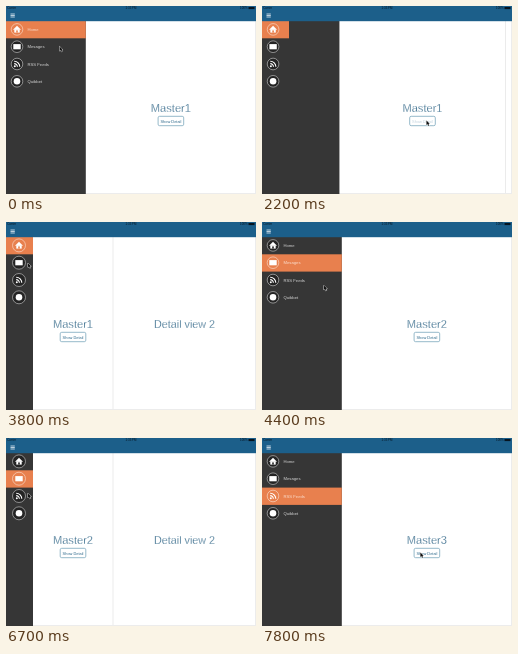
An HTML page with a canvas that plays this animation: 250x188 px, repeating every 8000 ms.

```html
<!DOCTYPE html>
<html lang="en">
<head>
<meta charset="utf-8">
<title>Split view navigation</title>
<style>
html, body { margin: 0; width: 100%; height: 100%; overflow: hidden; background: #fff; }
canvas { display: block; width: 250px; height: 188px; }
</style>
</head>
<body>
<canvas id="stage"></canvas>
<script>
const W = 250, H = 188, LOOP = 8000;
const BAR = 15, ROW = 17.3, OPEN = 79.8, CLOSED = 27, DETAIL = 143;
const SLIDE = 500, RELEASE = 600;
const BLUE = '#1c5f8a', ORANGE = '#e8804e', DARK = '#363636', INK = '#245d80';
const FONT = '"Liberation Sans", Arial, sans-serif';
const LABELS = ['Home', 'Mesages', 'RSS Feeds', 'Quibbet'];

// Start time of each slide and the state it leads to (1 = detail shown)
const SLIDES = [[2137, 1], [3890, 0], [5063, 1], [6840, 0]];
const PRESSES = [2100, 5030];
const PICKS = [3890, 6840];

// Cursor path: time, x, y
const PATH = [
  [0, 53.6, 40.5], [1350, 53.6, 40.5], [2000, 164.5, 114.6], [2450, 164.5, 114.6],
  [2800, 66, 52], [3150, 22, 41], [3800, 22, 41], [4250, 24, 43], [4400, 61.8, 63.5],
  [4900, 160.7, 114.5], [5600, 160.7, 114.5], [5900, 66, 66], [6600, 22, 55.5],
  [7200, 22, 55.5], [7700, 158.4, 114.5], [LOOP, 158.4, 114.5]
];

const canvas = document.getElementById('stage');
const dpr = window.devicePixelRatio || 1;
canvas.width = W * dpr;
canvas.height = H * dpr;
const c = canvas.getContext('2d');

const clamp = v => Math.min(1, Math.max(0, v));
const lerp = (a, b, k) => a + (b - a) * k;
const ease = k => k * k * (3 - 2 * k);

function detailAmount(t) {
  let p = 0;
  for (const [start, to] of SLIDES) {
    if (t >= start) p = lerp(1 - to, to, ease(clamp((t - start) / SLIDE)));
  }
  return p;
}

// Button text dims on press and fades back
function buttonAlpha(t) {
  const last = PRESSES.filter(at => t >= at).pop();
  return last === undefined ? 1 : lerp(0.15, 1, clamp((t - last) / RELEASE));
}

function cursorAt(t) {
  const i = Math.max(1, PATH.findIndex(p => p[0] > t));
  const [t0, x0, y0] = PATH[i - 1], [t1, x1, y1] = PATH[i];
  const k = clamp((t - t0) / (t1 - t0));
  return [lerp(x0, x1, k), lerp(y0, y1, k)];
}

function rect(x, y, w, h, color) {
  c.fillStyle = color;
  c.fillRect(x, y, w, h);
}

function disc(x, y, r, color) {
  c.fillStyle = color;
  c.beginPath();
  c.arc(x, y, r, 0, 7);
  c.fill();
}

function text(str, x, y, size, color, align = 'left') {
  c.font = `${size}px ${FONT}`;
  c.textAlign = align;
  c.fillStyle = color;
  c.fillText(str, x, y);
}

// Light-weight heading: a thin white outline trims the strokes
function heading(str, x, size) {
  text(str, x, 105.6, size, INK, 'center');
  c.strokeStyle = '#fff';
  c.lineWidth = 0.28;
  c.strokeText(str, x, 105.6);
}

function poly(points, color) {
  c.fillStyle = color;
  c.beginPath();
  points.forEach(([x, y]) => c.lineTo(x, y));
  c.closePath();
  c.fill();
}

const GLYPHS = [
  bg => {
    poly([[-4, 0.3], [0, -3.7], [4, 0.3]], '#fff');
    rect(-2.7, 0, 5.4, 3.2, '#fff');
    rect(-0.8, 1, 1.6, 2.2, bg);
  },
  () => rect(-3.7, -2.6, 7.4, 5.2, '#fff'),
  () => {
    disc(-2.2, 2.2, 1, '#fff');
    c.strokeStyle = '#fff';
    c.lineWidth = 1.1;
    for (const r of [3.2, 5.6]) {
      c.beginPath();
      c.arc(-2.8, 2.8, r, -Math.PI / 2, 0);
      c.stroke();
    }
  },
  () => disc(0, 0, 3.3, '#fff')
];

function drawSidebar(p, selected) {
  const expanded = p === 0;
  rect(0, BAR, lerp(OPEN, CLOSED, p), H - BAR, DARK);
  LABELS.forEach((label, i) => {
    const top = BAR + i * ROW, y = top + 8.4, on = i === selected;
    const bg = on ? ORANGE : '#242424';
    if (on) rect(0, top, expanded ? OPEN : CLOSED, ROW, ORANGE);
    const x = lerp(11, 13, p), r = lerp(5.8, 6.5, p);
    disc(x, y, r, bg);
    c.strokeStyle = on ? '#fbe3d6' : '#d0d0d0';
    c.lineWidth = 0.6;
    c.stroke();
    c.save();
    c.translate(x, y);
    GLYPHS[i](bg);
    c.restore();
    if (expanded) text(label, 21.5, y + 1.7, 4.2, on ? '#fbe0d2' : '#d8d8d8');
  });
}

function drawMaster(p, number, alpha) {
  const left = lerp(OPEN, CLOSED, p), right = W - DETAIL * p;
  const x = (left + right) / 2;
  heading('Master' + number, x, 11.1);
  c.strokeStyle = '#7ba7bd';
  c.lineWidth = 0.8;
  c.beginPath();
  c.roundRect(x - 12.8, 110.3, 25.6, 9.4, 1.5);
  c.stroke();
  c.globalAlpha = alpha;
  text('Show Detail', x, 116.5, 3.9, '#2b678a', 'center');
  c.globalAlpha = 1;
}

function drawDetail(p) {
  if (p === 0) return;
  const left = W - DETAIL * p;
  rect(left, BAR, DETAIL, H - BAR, '#fff');
  rect(left - 0.3, BAR, 0.6, H - BAR, '#dedede');
  heading('Detail view 2', left + DETAIL / 2, 10.75);
}

function drawHeader() {
  rect(0, 0, W, BAR + 0.2, BLUE);
  const ink = '#06141f';
  text('Carrier', 1.2, 3.1, 2.9, ink);
  text('1:33 PM', 125, 3.1, 2.9, ink, 'center');
  text('100%', 241.5, 3.1, 2.9, ink, 'right');
  rect(242.5, 1, 6, 2.1, ink);
  for (let i = 0; i < 3; i++) rect(4.5, 7.6 + i * 1.5, 4.3, 0.8, '#e4eef4');
}

function drawCursor(x, y) {
  c.save();
  c.translate(x, y);
  c.scale(0.88, 0.88);
  c.lineJoin = 'round';
  const arrow = [[0, 0], [0, 5], [1.2, 4], [2, 5.9], [2.9, 5.5], [2.1, 3.7], [3.6, 3.6]];
  poly(arrow, '#111');
  c.strokeStyle = '#fff';
  c.lineWidth = 0.9;
  c.stroke();
  poly(arrow, '#111');
  c.restore();
}

function draw(t) {
  const p = detailAmount(t);
  const selected = PICKS.filter(at => t >= at).length;
  c.setTransform(dpr, 0, 0, dpr, 0, 0);
  rect(0, 0, W, H, '#fff');
  drawMaster(p, selected + 1, buttonAlpha(t));
  drawDetail(p);
  rect(0, H - 1, W, 1, '#ececec');
  rect(W - 1, 0, 1, H, '#ececec');
  drawSidebar(p, selected);
  drawHeader();
  drawCursor(...cursorAt(t));
}

const begin = performance.now();
function tick() {
  draw((performance.now() - begin) % LOOP);
  requestAnimationFrame(tick);
}
tick();
</script>
</body>
</html>
```
